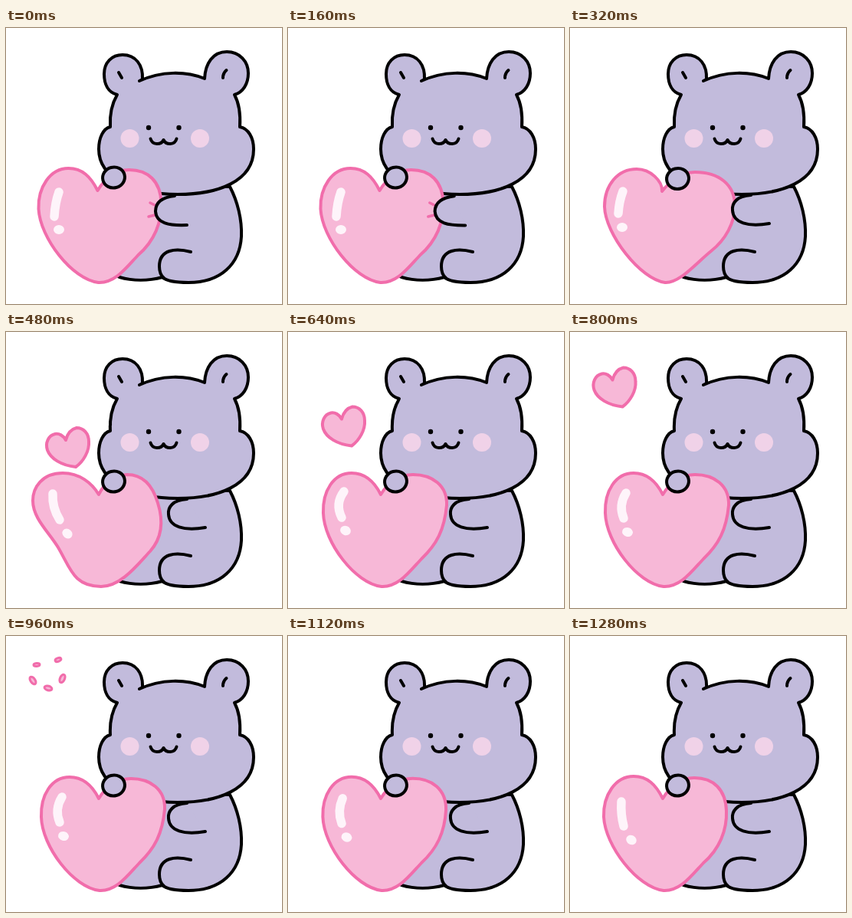
An HTML page for the animation above (1360 ms loop, 360 px wide and 360 px high).

```html
<!DOCTYPE html>
<html lang="en">
<head>
<meta charset="utf-8">
<title>Heart squeeze</title>
<style>
  html, body { margin: 0; width: 100%; height: 100%; overflow: hidden; background: #fff; }
  svg { display: block; width: 100%; height: 100%; }
  path, ellipse, circle { stroke-linecap: round; stroke-linejoin: round; }
  .fur { fill: #c2bbdc; stroke: #000; stroke-width: 4; }
  .line { fill: none; stroke: #000; stroke-width: 4; }
  .love { fill: #f7b8d7; stroke: #f16dab; stroke-width: 4; }
  .blush { fill: #f0d2e8; }
  .shine { fill: none; stroke: #fef4fa; stroke-width: 11.5; }
  .squeeze { fill: none; stroke: #f16dab; stroke-width: 3.5; }
</style>
</head>
<body>
<svg viewBox="0 0 360 360">
  <path class="fur" d="M292 207C302 226 308 250 307 272C305 308 280 332 238 332C222 332 209 330 204 325C186 330 165 330 148 325L130 318L130 200Z"/>
  <path class="line" d="M241 292C222 287 200 288 200 311C200 318 202 323 206 326"/>

  <path class="fur" d="M145 87C133 84 128 73 128 60C128 45 138 35 152 35C169 35 179 48 178 67L174 69C203 56 234 56 259 66C260 46 270 31 288 31C305 31 316 44 316 59C316 73 309 84 298 87C304 98 306 113 305 129C316 131 323 143 323 158C323 201 275 217 224 217C167 217 121 196 121 158C121 143 127 131 136 129C135 112 138 99 145 87Z"/>
  <path class="line" d="M147 58L151 65M287.500 55Q283 59 283 65"/>
  <circle class="blush" cx="161.500" cy="144" r="12"/>
  <circle class="blush" cx="253" cy="144" r="12"/>
  <circle cx="186" cy="130" r="3.200"/>
  <circle cx="225.500" cy="130" r="3.200"/>
  <path class="line" d="M188.500 144.500C191 153 202 153 205.500 146C209 153 220 153 222.500 144.500"/>

  <g id="small"><path class="love" d="M-3 -10C-6 -16 -12 -19 -17 -18C-26 -16 -30 -6 -27 3C-23 14 -9 23 10 25C20 18 28 4 27 -8C27 -19 20 -26 11 -26C3 -24 -1 -18 -3 -10Z"/></g>
  <g id="burst"></g>

  <path id="heart" class="love"/>
  <path id="shine" class="shine"/>
  <ellipse id="dot" rx="7" ry="6" fill="#fef4fa"/>
  <path id="squeeze" class="squeeze" d="M188 228L194 231M186 246L194 244"/>
  <path id="arm" class="fur"/>
  <ellipse id="hand" class="fur" rx="14.500" ry="13.500"/>
</svg>
<script>
const STEP = 80, LOOP = 1360;
const $ = id => document.getElementById(id);

const rest = "M121 212C112 194 99 184 83 184C59 184 45 208 46 236C47 275 88 328 122 332C144 333 158 313 174 296C194 277 204 258 207 226C208 200 188 186 163 186C147 186 131 195 121 212Z";
const slim = "M121 212C112 194 101 183 83 183C59 183 43 208 44 236C46 274 88 328 122 332C144 333 158 313 174 296C195 278 205 253 204 228C203 200 187 185 162 185C146 185 131 195 121 212Z";
const bulge = "M120 213C121 200 105 184 87 184C62 184 45 205 45 233C46 269 92 328 124 332C143 333 163 308 184 291C203 276 215 254 215 232C215 204 194 188 163 188C147 188 130 200 120 213Z";
const tilt = "M121 212C112 197 96 184 74 184C47 184 35 203 35 220C35 243 56 261 68 281C84 308 88 332 124 332C150 332 172 303 188 286C204 268 205 245 198 223C190 196 176 186 158 186C142 187 128 197 121 212Z";
const armOpen = "M236 218C217 219 211 229 212 238C213 254 232 260 260 255";
const armHug = "M220 219C202 221 195 229 195 239C196 255 213 258 236 257";

// Blend two paths that share the same commands.
function mix(a, b, k) {
  const to = b.match(/-?\d+/g);
  let i = 0;
  return a.replace(/-?\d+/g, n => +n + (to[i++] - n) * k);
}

// Highlight: stroke start, bend, end, then the dot centre and its turn.
const shines = {
  hug: [69, 214, 64, 228, 63, 246, 69, 263, 0],
  bulge: [69, 213, 64, 226, 63, 242, 68, 260, 0],
  tilt: [61, 211, 60, 229, 70, 245, 80, 263, 40],
  back: [73, 208, 61, 224, 70, 242, 75, 259, 20],
  rest: [73, 210, 63, 226, 70, 243, 75, 261, 15],
  late: [67, 216, 66, 233, 70, 248, 80, 266, 30]
};
const blend = (a, b, k) => shines[a].map((v, i) => v + (shines[b][i] - v) * k);

// One entry per step: heart outline, shift, highlight, arm hug, hand drop, small heart, burst.
const calm = { heart: rest, dx: 0, shine: shines.rest, hug: 0, drop: 0 };
const hugging = { ...calm, heart: slim, dx: -1.5, shine: shines.hug, hug: 1 };
const tight = { ...hugging, hug: 1.2 };
const poses = [
  hugging,
  { ...hugging, hug: 1.15 },
  tight,
  tight,
  { ...calm, heart: bulge, shine: shines.bulge, drop: 1.5 },
  { ...calm, heart: mix(bulge, tilt, .6), shine: blend("bulge", "tilt", .6), drop: .6, small: [86, 167, .7] },
  { ...calm, heart: tilt, shine: shines.tilt, small: [81, 151, 1] },
  { ...calm, heart: mix(tilt, rest, .6), shine: blend("tilt", "back", .6), small: [77.5, 139, 1] },
  { ...calm, shine: shines.back, small: [73, 123.5, 1] },
  { ...calm, shine: blend("back", "rest", .5), small: [66, 100, 1] },
  { ...calm, small: [58.5, 72.5, 1] },
  { ...calm, burst: [.7, 1.1] },
  { ...calm, burst: [1, 1] },
  { ...calm, burst: [1, .5] },
  { ...calm, heart: mix(rest, slim, .3), shine: blend("rest", "late", .3) },
  { ...calm, heart: mix(rest, slim, .65), shine: blend("rest", "late", .65) },
  { ...calm, heart: slim, shine: shines.late }
];

// Burst pieces: x, y, half width, half height, turn.
const pieces = [
  [40, 37.5, 4, 2, -5], [68, 31, 4, 2.2, -20],
  [35, 58, 5.5, 3, 55], [55, 68, 5, 2.8, 15], [73.5, 55.5, 5.5, 3, -65]
].map(p => {
  const el = document.createElementNS("http://www.w3.org/2000/svg", "ellipse");
  el.setAttribute("class", "love");
  el.style.strokeWidth = 3;
  $("burst").append(el);
  return { el, p };
});

function set(el, attrs) {
  for (const k in attrs) el.setAttribute(k, attrs[k]);
}
const show = (el, on) => { el.style.display = on ? "" : "none"; };

function draw(pose) {
  const [x1, y1, bx, by, x2, y2, cx, cy, turn] = pose.shine;
  set($("heart"), { d: pose.heart, transform: `translate(${pose.dx})` });
  set($("shine"), { d: `M${x1} ${y1}Q${bx} ${by} ${x2} ${y2}` });
  set($("dot"), { cx, cy, transform: `rotate(${turn} ${cx} ${cy})` });
  set($("arm"), { d: mix(armOpen, armHug, pose.hug) });
  set($("hand"), { transform: `translate(140.5 ${195 + pose.drop}) rotate(-15)` });
  set($("squeeze"), { transform: `translate(${(1 - pose.hug) * 16})` });
  show($("squeeze"), pose.hug);

  show($("small"), pose.small);
  if (pose.small) {
    const [x, y, s] = pose.small;
    set($("small"), { transform: `translate(${x} ${y}) scale(${s})` });
  }
  show($("burst"), pose.burst);
  if (pose.burst) {
    const [spread, size] = pose.burst;
    for (const { el, p: [x, y, rx, ry, a] } of pieces) {
      const px = 55 + (x - 55) * spread, py = 50 + (y - 50) * spread;
      set(el, { rx, ry, transform: `translate(${px} ${py}) rotate(${a}) scale(${size})` });
    }
  }
}

const start = performance.now();
let last = -1;
function tick() {
  const step = Math.floor((performance.now() - start) % LOOP / STEP);
  if (step !== last) draw(poses[last = step]);
  requestAnimationFrame(tick);
}
tick();
</script>
</body>
</html>
```
